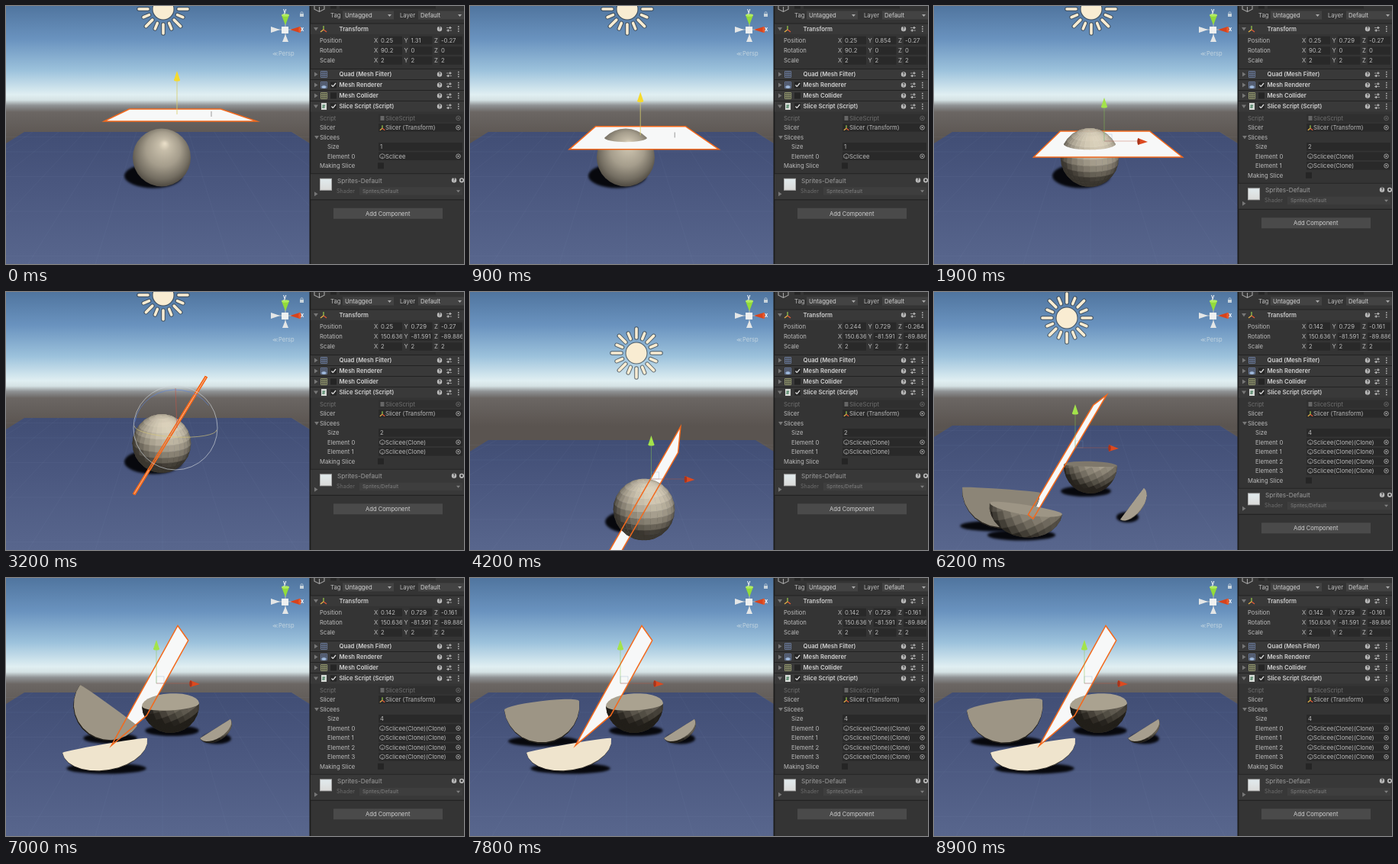
Recreate the animation shown at these times as an HTML page with a canvas. Size 600 px wide and 338 px high, loop 9 s.

```html
<!DOCTYPE html>
<html>
<head>
<meta charset="utf-8">
<style>
html, body { margin: 0; height: 100%; overflow: hidden; background: #333; }
canvas { display: block; }
</style>
</head>
<body>
<canvas id="stage" width="600" height="338"></canvas>
<script>
const c = document.getElementById('stage').getContext('2d');
const LOOP = 9000, STEP = 100, ORANGE = '#f4691c', TEXT = '#bcbcbc';
const FIRST_CUT = 1600, ROTATE_TOOL = 2100, MOVE_TOOL = 4000, SECOND_CUT = 5100, BREAK = 5300;

const mix = (a, b, u) => a.map((v, i) => v + (b[i] - v) * u);
// Passes through the poses, one progress value for each step
const follow = (poses, ...steps) => poses.reduce((a, b, i) => mix(a, b, steps[i - 1]));
const linear = (t, from, to) => Math.min(1, Math.max(0, (t - from) / (to - from)));
const ease = (t, from, to) => { const u = linear(t, from, to); return u * u * (3 - 2 * u); };
const progress = t => ({
  drop: ease(t, 200, 1200), turn: ease(t, 2200, 3000), orbit: ease(t, 3300, 4000),
  slide: ease(t, 4100, 4800), fall: linear(t, BREAK, 6200), swing: linear(t, 6200, 7000), rock: ease(t, 7000, 7900)
});

// Plane: centre, angle, half length, half width as a vector, taper
const planePoses = [[225, 143, 0, 80, 3.5, 8, .25], [226, 181, 0, 78, 2, 17, .25], [215, 188, -1.02, 90, 1, .5, 0],
  [222, 268, -1.05, 86, 3.5, 8, -.12], [172, 218, -1.035, 89, 6, -2, .06], [196.5, 136, -1.065, 73, 15, -5, -.23]];
// Pieces are half bowls: two rim ends, depth, then face bulge above and below the rim
const pieces = [
  { light: [.5, .6], poses: [[192, 268, 262, 268, 45, -.1, .9], [37, 256, 139, 263, 50, -.03, .97],
    [97, 140, 172, 194, 46, -.03, .97], [43, 174, 142, 160, 50, -.12, .97]] },
  { light: [.42, .68], poses: [[215, 275, 275, 275, 35, 0, .1], [170, 226, 240, 228, 37, -.14, .05], [178, 168, 253, 164, 37, -.4, .2]] },
  { light: [.66, .66], poses: [[252, 318, 274, 272, 12, 0, .9], [244, 298, 275, 257, 14, 0, .95], [254, 210, 294, 185, 16, 0, .8]] },
  { light: [.6, 1.1], poses: [[192, 285, 262, 285, 38, 0, .1], [73, 276, 168, 291, 38, -.12, .22], [74, 229, 185, 210, 33, -.06, .97]] }];

const tone = d => `rgb(${58 + 165 * d | 0},${54 + 159 * d | 0},${47 + 144 * d | 0})`;

function poly(pts, fill, stroke, width = 1) {
  c.beginPath();
  pts.forEach(p => c.lineTo(p[0], p[1]));
  c.closePath();
  if (fill) { c.fillStyle = fill; c.fill(); }
  if (stroke) { c.strokeStyle = stroke; c.lineWidth = width; c.stroke(); }
}
function line(x1, y1, x2, y2, color, width = 1) {
  c.beginPath(); c.moveTo(x1, y1); c.lineTo(x2, y2);
  c.strokeStyle = color; c.lineWidth = width; c.stroke();
}
function rect(x, y, w, h, fill) { c.fillStyle = fill; c.fillRect(x, y, w, h); }
function oval(x, y, rx, ry, fill, stroke, width = 1) {
  c.beginPath(); c.ellipse(x, y, rx, ry, 0, 0, 7);
  if (fill) { c.fillStyle = fill; c.fill(); }
  if (stroke) { c.strokeStyle = stroke; c.lineWidth = width; c.stroke(); }
}
function fade(y0, y1, ...stops) {
  const g = c.createLinearGradient(0, y0, 0, y1);
  stops.forEach(s => g.addColorStop(...s));
  return g;
}
function shadow(x, y, rx, ry) {
  c.save();
  c.filter = 'blur(1.5px)';
  oval(x, y, rx, ry, '#07080d');
  c.restore();
}

function smoothBall(x, y, r) {
  const g = c.createRadialGradient(x + 4, y - r * .48, 1, x, y - r * .1, r * 1.15);
  [[0, 1.05], [.15, .85], [.5, .65], [.8, .35], [1, .08]].forEach(s => g.addColorStop(s[0], tone(s[1])));
  oval(x, y, r, r, g);
}
function facetBall(x, y, r, ambient = 0, tilt = 0) {
  const cp = Math.cos(.3), sp = Math.sin(.3), ct = Math.cos(tilt), st = Math.sin(tilt), ROWS = 14, COLS = 28;
  const point = ([i, j]) => {
    const lat = (i / ROWS - .5) * Math.PI, lon = j / COLS * 2 * Math.PI;
    const px = Math.cos(lat) * Math.sin(lon), py = Math.sin(lat), pz = Math.cos(lat) * Math.cos(lon);
    const up = py * cp - pz * sp;
    return [px * ct - up * st, px * st + up * ct, py * sp + pz * cp];
  };
  for (let i = 0; i < ROWS; i++) for (let j = 0; j < COLS; j++) {
    const n = point([i + .5, j + .5]);
    if (n[2] < -.08) continue;
    const d = ambient + Math.max(0, n[0] * .2 + n[1] * .6 + n[2] * .75);
    const color = tone(Math.min(1, Math.max(-.15, d)));
    const corners = [[i, j], [i + 1, j], [i + 1, j + 1], [i, j + 1]].map(point);
    poly(corners.map(p => [x + p[0] * r, y - p[1] * r]), color, color, .5);
  }
}

function drawWorld(top) {
  rect(0, 0, 398, 338, fade(0, 176, [0, '#50759f'], [.25, '#6a93bf'], [.48, '#9cc2dc'],
    [.66, '#e0eff2'], [.7, '#d5e2e4'], [.74, '#8f9294'], [.79, '#6b6663'], [1, '#5a5450']));
  poly([[0, top + 15], [24, top], [374, top], [398, top + 15], [398, 338], [0, 338]],
    fade(top, 338, [0, '#414e75'], [.4, '#4a577f'], [1, '#58668d']));
  c.save();
  c.beginPath(); c.rect(0, top, 398, 338); c.clip();
  for (let i = -9; i < 10; i++) line(205 + i * 34, top, 205 + i * 88, 338, 'rgba(150,165,205,.1)', .6);
  for (let i = 1; i < 6; i++) line(0, top + i * i * 6.5, 398, top + i * i * 6.5, 'rgba(150,165,205,.1)', .6);
  c.restore();
}
function drawSun(x, y) {
  for (const [color, grow] of [['rgba(50,55,60,.7)', 2], ['#f9ecd2', 0]]) {
    c.lineCap = 'round';
    for (let i = 0; i < 16; i++) {
      const a = i * Math.PI / 8, dx = Math.cos(a), dy = Math.sin(a), end = i % 2 ? 28 : 32;
      line(x + dx * 20, y + dy * 20, x + dx * end, y + dy * end, color, 3.6 + grow);
    }
    c.lineCap = 'butt';
    oval(x, y, 13.5 + grow / 2, 13.5 + grow / 2, color);
  }
}

function drawHandles(dragging, x, y) {
  const cone = dragging ? '#f6da2c' : '#a3e34b';
  line(x, y, x, y - 44, dragging ? '#d8cf6a' : 'rgba(134,198,83,.6)', .8);
  poly([[x - 4, y - 45], [x, y - 57], [x + 4, y - 45]], cone);
  oval(x, y - 45, 4, 1.5, cone);
  if (dragging) return line(x + 45, y - 4, x + 45, y + 3, '#9a9a9a');
  c.strokeStyle = 'rgba(120,150,190,.4)'; c.lineWidth = .7;
  c.strokeRect(x, y - 9, 10, 9);
  line(x, y, x + 45, y, 'rgba(190,85,60,.5)', .8);
  poly([[x + 44, y - 4], [x + 57, y + 1], [x + 44, y + 5]], '#dc4a20');
  oval(x + 45, y + .5, 1.7, 4, '#a8341b');
}
function drawRing(x, y) {
  oval(x, y, 55, 55, null, 'rgba(205,210,215,.75)', .9);
  c.lineWidth = .9;
  c.beginPath(); c.ellipse(x, y, 54, 12, .05, 0, Math.PI);
  c.strokeStyle = 'rgba(215,200,120,.7)'; c.stroke();
  c.beginPath(); c.ellipse(x, y, 54, 50, 0, Math.PI * 1.05, Math.PI * 1.8);
  c.strokeStyle = 'rgba(90,130,215,.7)'; c.stroke();
  line(x, y - 52, x + 2, y, 'rgba(205,80,65,.6)', .9);
}

// Corners: far left, far right, near right, near left
function planeCorners([x, y, angle, half, wx, wy, taper]) {
  const corner = (end, side) => {
    const l = end * half * (1 + side * taper);
    return [x + side * wx + l * Math.cos(angle), y + side * wy + l * Math.sin(angle)];
  };
  return [corner(-1, -1), corner(1, -1), corner(1, 1), corner(-1, 1)];
}

// The part of the ball that stands in front of the plane
function drawCap([px, py, angle, half, wx, wy], [x, y, r], draw) {
  const ux = Math.cos(angle), uy = Math.sin(angle), d = (x - px) * uy - (y - py) * ux;
  if (Math.abs(d) >= r) return;
  const rx = Math.sqrt(r * r - d * d), ry = rx * Math.abs(wy * ux - wx * uy) / half;
  c.save();
  c.translate(x - uy * d, y + ux * d);
  c.rotate(angle);
  c.beginPath();
  c.moveTo(-rx, 0); c.lineTo(-r - 5, -2 * r); c.lineTo(r + 5, -2 * r);
  c.ellipse(0, 0, rx, ry, 0, 0, Math.PI);
  c.closePath();
  c.rotate(-angle);
  c.translate(uy * d - x, -ux * d - y);
  c.clip();
  draw();
  c.restore();
}

function drawPieces({ fall, swing, rock }) {
  const shapes = pieces.map(p => ({ light: p.light, pose: follow(p.poses, fall, swing, rock) }));
  for (const { pose: [x1, y1, x2, y2, depth] } of shapes)
    shadow((x1 + x2) / 2 - 6 + 8 * swing, Math.max(y1, y2, (y1 + y2) / 2 + depth) - 3, (x2 - x1) * .47, 7);
  for (const { light, pose: [x1, y1, x2, y2, depth, above, below] } of shapes) {
    const mx = (x1 + x2) / 2, my = (y1 + y2) / 2, hx = x2 - mx, hy = y2 - my, half = Math.hypot(hx, hy);
    const arc = bulge => Array.from({ length: 15 }, (_, i) => {
      const a = i / 14 * Math.PI, s = Math.sin(a) * depth * bulge / half;
      return [mx - Math.cos(a) * hx - hy * s, my - Math.cos(a) * hy + hx * s];
    });
    c.save();
    poly(arc(1), tone(0));
    c.clip();
    facetBall(mx, my, half + 3, -.12 - .28 * swing, .45);
    c.restore();
    poly([...arc(above), ...arc(below).reverse()], tone(light[0] + (light[1] - light[0]) * swing));
  }
}

function drawAxes() {
  line(353, 31, 377, 31, '#b9bec2'); line(366, 20, 366, 42, '#b9bec2');
  poly([[347, 27], [347, 35], [359, 31]], '#e4e6e6');
  poly([[362, 47], [370, 47], [366, 37]], '#e4e6e6');
  poly([[361, 12], [371, 12], [366, 25]], '#93dc3a');
  oval(366, 12, 5, 1.8, '#b2ec62');
  poly([[385, 27], [385, 35], [372, 31]], '#d8431c');
  oval(385, 31, 1.6, 4, '#e65a2c');
  rect(361, 27, 9, 9, '#eef0f0');
  text('y', 363, 6, 7.5, '#fff', 600);
  text('x', 386, 30, 7.5, '#fff', 600);
  text('≪', 349, 62, 7, '#c2d4df');
  text('Persp', 357, 62, 7.6, '#c2d4df');
  rect(385, 10, 5, 4, '#c7d3db');
  c.beginPath(); c.arc(387.5, 9.5, 1.7, Math.PI, 0);
  c.strokeStyle = '#c7d3db'; c.lineWidth = .9; c.stroke();
}

function drawScene(t, p) {
  const { drop, turn, orbit, slide, fall, swing } = p;
  const [sunX, sunY, top] = follow([[206, 4, 165], [218, 80, 194], [174, 34, 175], [150, -60, 150]], orbit, fall, swing);
  const ball = mix([204, 198.5, 38], [228, 285, 40], orbit), [x, y, r] = ball;
  const pose = follow(planePoses, drop, turn, orbit, fall, swing);
  const handle = follow([[224, 142], [223, 177], [228, 245], [185, 204], [197, 138]], drop, orbit, fall, swing);
  const pending = 10 * (orbit - slide);
  pose[0] += pending; handle[0] += pending;
  const corners = planeCorners(pose), outline = () => poly(corners, null, ORANGE, 1.5);
  const drawBall = () => t < FIRST_CUT ? smoothBall(x, y, r) : facetBall(x, y, r);

  c.save();
  c.beginPath(); c.rect(0, 0, 398, 338); c.clip();
  drawWorld(top);
  drawSun(sunX, sunY);
  if (t <= BREAK) shadow(x - 11, y + 24 - 8 * orbit, r, 16);
  if (orbit === 0) drawBall();
  poly(corners, '#f7f8f8');
  if (t > BREAK) drawPieces(p);
  else if (orbit > 0) {
    if (t >= SECOND_CUT) facetBall(x + 21, y + 6, 37, -.12);
    drawBall();
  } else {
    outline();
    drawCap(pose, ball, drawBall);
  }
  if (turn > 0) outline();
  if (t >= ROTATE_TOOL && t < MOVE_TOOL) { if (orbit === 0) drawRing(222, 178); }
  else drawHandles(drop < 1, ...handle);
  drawAxes();
  c.restore();
}

function text(s, x, y, size = 7.7, color = TEXT, weight = 400) {
  c.font = `${weight} ${size}px Inter, sans-serif`;
  c.textBaseline = 'middle';
  c.fillStyle = color;
  c.fillText(s, x, y + .5);
}
function fold(y, open, x = 406) {
  poly(open ? [[x - 3, y - 2], [x + 3, y - 2], [x, y + 2.5]] : [[x - 2, y - 3], [x + 2.5, y], [x - 2, y + 3]], '#777');
}
function help(x, y) {
  oval(x, y, 3.2, 3.2, '#bbb');
  text('?', x - 1.6, y, 5.5, '#333', 700);
}
function checkbox(x, y, on) {
  rect(x - 4, y - 4, 8, 8, '#252525');
  if (on) { line(x - 2.5, y, x - .7, y + 2.2, '#ddd', 1.3); line(x - .7, y + 2.2, x + 3, y - 2.5, '#ddd', 1.3); }
}
function header(y, title, open, check) {
  rect(399, y - 7, 201, 14, '#393939');
  rect(399, y - 7.5, 201, 1, '#222');
  fold(y, open);
  text(title, 436.5, y, 7.7, '#d2d2d2', 600);
  if (check !== undefined) checkbox(429, y, check);
  help(568, y);
  for (const [dy, x] of [[-1.5, 581], [2, 578.5]]) {
    line(577, y + dy, 584, y + dy, '#aaa', .8);
    rect(x, y + dy - 1.5, 1.5, 3, '#bbb');
  }
  for (let i = -1; i < 2; i++) rect(592, y + i * 3 - .7, 1.5, 1.5, '#bbb');
}
function grid(y, color) {
  for (let d = 0; d < 9; d += 2.7) {
    line(412.5 + d, y - 4, 412.5 + d, y + 4, color, .8);
    line(412.5, y - 4 + d, 420.5, y - 4 + d, color, .8);
  }
}
function tripod(x, y, s) {
  line(x, y - s, x, y, '#9bcf4d', 1.2); line(x, y, x - s * .8, y + s * .6, '#eab648', 1.2); line(x, y, x + s * .8, y + s * .6, '#e65a37', 1.2);
}
function cube(x, y, s, width) {
  poly([[x - s, y - s / 2], [x, y - s], [x + s, y - s / 2], [x + s, y + s / 2], [x, y + s], [x - s, y + s / 2]], null, '#a5a5a5', width);
  line(x, y, x, y + s, '#a5a5a5', width);
}
function objectField(label, value, y, indent, dim) {
  const color = dim ? '#707070' : TEXT;
  text(label, indent, y, 7.7, color);
  rect(488, y - 5.3, 110, 10.6, dim ? '#2f2f2f' : '#292929');
  if (label === 'Slicer') tripod(493, y + 1, 4);
  else if (dim) rect(490.5, y - 3, 5, 6, '#666');
  else cube(493, y, 3.2, .8);
  text(value, 497, y, 7.7, color);
  oval(592.5, y, 2.8, 2.8, null, color, .8); oval(592.5, y, 1, 1, color);
}
function vector(label, y, ...nums) {
  text(label, 411, y);
  nums.forEach((n, i) => {
    const x = 489 + i * 39.5;
    text('XYZ'[i], x - 7, y);
    c.save();
    c.beginPath(); c.rect(x, y - 5.3, 30, 10.6); c.clip();
    rect(x, y - 6, 31, 12, '#292929');
    text(String(+n.toFixed(3)), x + 2, y);
    c.restore();
  });
}
function dropdown(value, x, y, w) {
  rect(x, y - 5.5, w, 11, '#434343');
  text(value, x + 3, y, 7.7, '#d2d2d2');
  poly([[x + w - 8, y - 1], [x + w - 3, y - 1], [x + w - 5.5, y + 2]], '#aaa');
}

function drawPanel(t, { drop, turn, slide }) {
  const count = t < FIRST_CUT ? 1 : t < SECOND_CUT ? 2 : 4;
  rect(398, 0, 202, 338, '#343434');
  rect(397.5, 0, 1.8, 338, '#1d1d1d');
  cube(410.5, 1, 6.5, 1.1);
  rect(425, 0, 8, 3.5, '#252525'); rect(437, 0, 126, 3.5, '#292929');
  text('Tag', 425, 12); dropdown('Untagged', 441, 12, 67);
  text('Layer', 516, 12); dropdown('Default', 540, 12, 60);

  header(30, 'Transform', true);
  tripod(416, 31, 5);
  vector('Position', 45, .25 - .108 * slide, 1.31 - .581 * drop, -.27 + .109 * slide);
  vector('Rotation', 58.5, 90.2 + 60.436 * turn, -81.591 * turn, -89.886 * turn);
  vector('Scale', 71.5, 2, 2, 2);
  header(89.5, 'Quad (Mesh Filter)', false); grid(89.5, '#7386ac');
  header(103.5, 'Mesh Renderer', false, true); grid(103.5, '#7186b0');
  oval(416.5, 106, 3, 2, '#9cb5d8');
  header(117.5, 'Mesh Collider', false, false); grid(117.5, '#a8ae7c');
  header(131.5, 'Slice Script (Script)', true, true);
  rect(413, 127, 7, 9, '#d5d9d5'); text('#', 414, 131.5, 6.5, '#3d7b57', 700);

  objectField('Script', 'SliceScript', 147, 411, true);
  objectField('Slicer', 'Slicer (Transform)', 159.3, 411);
  fold(172, true, 407); text('Slicees', 411, 172);
  text('Size', 421, 184.3);
  rect(488, 179, 110, 10.6, '#292929'); text(count, 490, 184.3);
  const name = 'Sclicee' + '(Clone)'.repeat(count / 2);
  for (let i = 0; i < count; i++) objectField('Element ' + i, name, 196.8 + i * 12.5, 421);

  const y = 196.8 + count * 12.5;
  text('Making Slice', 411, y); checkbox(491, y, false);
  rect(399, y + 10, 201, 1, '#222');
  rect(399, y + 11, 201, 33, '#383838');
  rect(411, y + 16.5, 16, 16, '#aaa');
  rect(412, y + 17.5, 14, 14, fade(y + 17, y + 32, [0, '#e2ebee'], [1, '#dadad8']));
  text('Sprites-Default', 434, y + 19.5, 8.2, '#9f9f9f');
  text('Shader', 433, y + 33, 7.1, '#6c6c6c');
  rect(463, y + 28, 135, 10.5, '#3e3e3e');
  text('Sprites/Default', 467, y + 33, 6.7, '#808080');
  poly([[590, y + 32], [595, y + 32], [592.5, y + 35]], '#808080');
  fold(y + 37, false);
  help(587, y + 19);
  oval(597, y + 19, 2.3, 2.3, null, '#bbb', 1.7);
  rect(399, y + 44, 201, 1.2, '#222');
  rect(429, y + 55.5, 143, 14, '#4a4a4a');
  text('Add Component', 471, y + 62.5, 7.6, '#cfcfcf');
}

function frame(now) {
  const t = Math.floor(now % LOOP / STEP) * STEP, p = progress(t);
  drawScene(t, p);
  drawPanel(t, p);
  requestAnimationFrame(frame);
}
requestAnimationFrame(frame);
</script>
</body>
</html>
```
